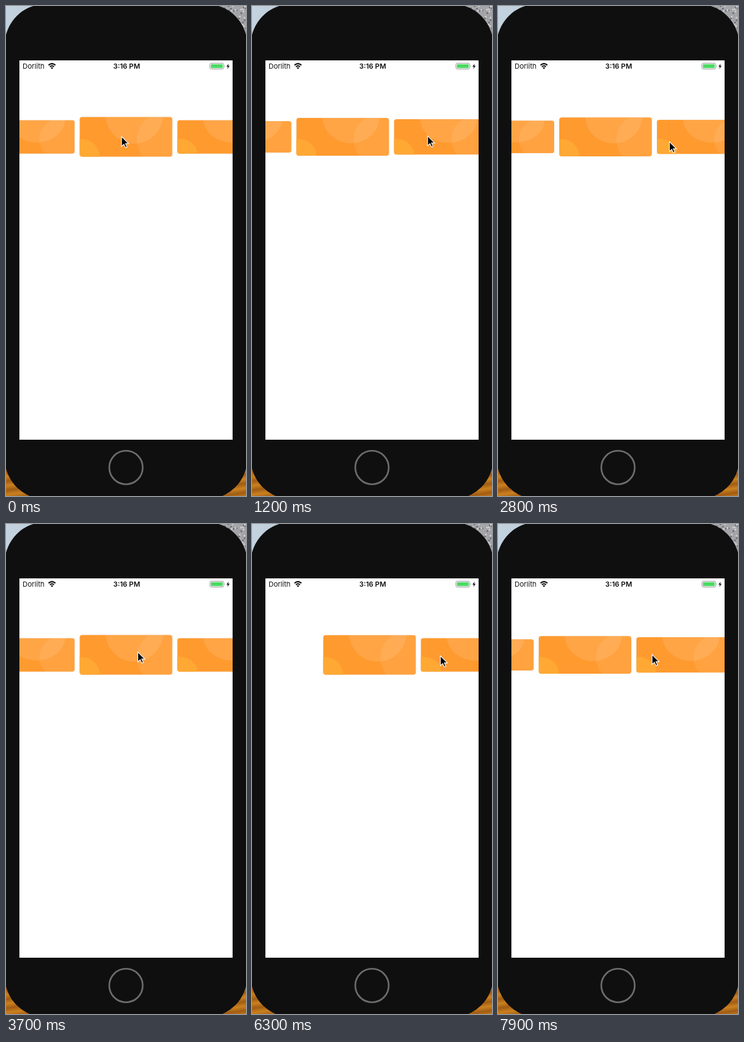
An HTML page that plays this animation: 376x766 px, repeating every 8000 ms.

```html
<!DOCTYPE html>
<html lang="en">
<head>
<meta charset="utf-8">
<title>Card carousel</title>
<style>
  html, body { margin: 0; width: 100%; height: 100%; overflow: hidden; background: #0f0f0f; }
  svg { display: block; }
  text { font: 11px Inter, Roboto, sans-serif; fill: #111; }
  .clock { font-weight: 600; text-anchor: middle; }
</style>
</head>
<body>
<svg width="376" height="766" viewBox="0 0 376 766">
  <defs>
    <linearGradient id="sky">
      <stop offset="0" stop-color="#c3d3df"/>
      <stop offset="1" stop-color="#a3a3a7"/>
    </linearGradient>
    <linearGradient id="wood" gradientUnits="userSpaceOnUse" x1="0" y1="0" x2="1" y2="7" spreadMethod="reflect">
      <stop offset="0" stop-color="#a05c14"/>
      <stop offset="1" stop-color="#cb811f"/>
    </linearGradient>
    <clipPath id="screen"><path d="M21 85H355V678H21z"/></clipPath>
    <clipPath id="cardEdge"><rect x="-.5" y="-.5" width="145" height="62" rx="4"/></clipPath>
    <g id="card">
      <rect x="-1.5" y="-1.5" width="147" height="64" rx="5" fill-opacity=".03"/>
      <g clip-path="url(#cardEdge)">
        <rect x="-1" y="-1" width="146" height="63" fill="#ff9a2f"/>
        <circle cx="3" cy="62" r="28" fill="#ffa834"/>
        <g fill="#fff">
          <circle cx="85" cy="-4" r="45" fill-opacity=".11"/>
          <circle cx="131" cy="35" r="42" fill-opacity=".08"/>
        </g>
      </g>
    </g>
  </defs>

  <!-- surroundings and phone body -->
  <rect width="376" height="383" fill="url(#sky)"/>
  <g id="speckles"></g>
  <rect y="383" width="376" height="383" fill="url(#wood)"/>
  <rect x="-2" y="-3" width="380" height="774" rx="64" fill="#0f0f0f"/>
  <path d="M21 85H355V678H21z" fill="#fff"/>
  <circle cx="188" cy="721.5" r="26.2" fill="none" stroke="#6c6c6c" stroke-width="2.6"/>

  <!-- status bar -->
  <text x="26" y="98">Dorlith</text>
  <text x="189" y="98" class="clock">3:16 PM</text>
  <path d="M66.6 92.6Q72 87.6 77.4 92.6M68.8 95Q72 92.1 75.2 95" fill="none" stroke="#111" stroke-width="2"/>
  <path d="M70 96.6Q72 95 74 96.6L72 98.8z" fill="#111"/>
  <rect x="319.5" y="89.5" width="21.5" height="9" rx="2" fill="#fff" stroke="#999"/>
  <rect x="321" y="91" width="18.5" height="6" rx=".8" fill="#4cd964"/>
  <path d="M342 92.5q1.4 1.5 0 3z" fill="#999"/>
  <path d="M348.8 90L345.4 94.8H347.6L346.8 98.4L350.4 93.4H348.1z" fill="#111"/>

  <g id="cards" clip-path="url(#screen)"></g>
  <path id="cursor" d="M0 0V15.4L3.7 12.1L6.2 17.6L8.6 16.5L6.2 11.1H11z" stroke="#fff" stroke-width="1.1"/>
</svg>
<script>
const LOOP = 8000, PITCH = 153, SWIPE = 600, FIRST_PAGE = 1;

// Each swipe grabs at (x, y) and moves the row by a number of pages.
const swipes = [
  { at: 100, pages: 1, x: 181, y: 204 },
  { at: 982, pages: 1, x: 321, y: 203 },
  { at: 1850, pages: -1, x: 140, y: 208 },
  { at: 2666, pages: 1, x: 288, y: 212 },
  { at: 3400, pages: -2, x: 130, y: 200 },
  { at: 4170, pages: -1, x: 134, y: 186 },
  { at: 4900, pages: 1, x: 290, y: 196 },
  { at: 5560, pages: -1, x: 146, y: 206 },
  { at: 6243, pages: 1, x: 299, y: 206 },
  { at: 6935, pages: 1, x: 361, y: 203 },
  { at: 7666, pages: 1, x: 293, y: 204 }
];

const $ = id => document.getElementById(id);

function add(parent, tag, attrs) {
  const el = document.createElementNS("http://www.w3.org/2000/svg", tag);
  for (const name in attrs) el.setAttribute(name, attrs[name]);
  return $(parent).appendChild(el);
}

let seed = 7;
const random = () => (seed = seed * 16807 % 2147483647) / 2147483647;
for (let i = 0; i < 90; i++) {
  const x = 336 + random() * 40, y = random() * 46;
  add("speckles", "circle", { cx: x, cy: y, r: 1.3, fill: random() < 0.5 ? "#66676c" : "#d5d5d8" });
}

const cards = Array.from({ length: 6 }, () => add("cards", "use", { href: "#card" }));

function smooth(u) {
  u = Math.min(Math.max(u, 0), 1);
  return u * u * (3 - 2 * u);
}

function pose(t) {
  let page = FIRST_PAGE, { x, y } = swipes[0], free = 0;
  for (const swipe of swipes) {
    // Between swipes the cursor travels to the next grab point.
    const travel = swipe.at > free ? smooth((t - free) / (swipe.at - free)) : 1;
    x += (swipe.x - x) * travel;
    y += (swipe.y - y) * travel;
    if (t < swipe.at) break;
    const done = smooth((t - swipe.at) / SWIPE);
    page += swipe.pages * done;
    x -= Math.sign(swipe.pages) * PITCH * done;
    free = swipe.at + SWIPE;
    if (t < free) break;
  }
  return { scroll: page * PITCH, x, y };
}

function draw(now) {
  const t = Math.floor(now % LOOP / 100) * 100;
  const { scroll, x, y } = pose(t);
  cards.forEach((card, i) => {
    const d = i * PITCH - scroll;
    const scale = Math.max(1 - 0.16 * Math.abs(d) / PITCH, 0.5);
    card.setAttribute("transform", `translate(${116 + d} 204.6) scale(1 ${scale}) translate(0 -30.5)`);
  });
  $("cursor").setAttribute("transform", `translate(${x} ${y})`);
  requestAnimationFrame(() => draw(performance.now() - start));
}

const start = performance.now();
draw(0);
</script>
</body>
</html>
```
